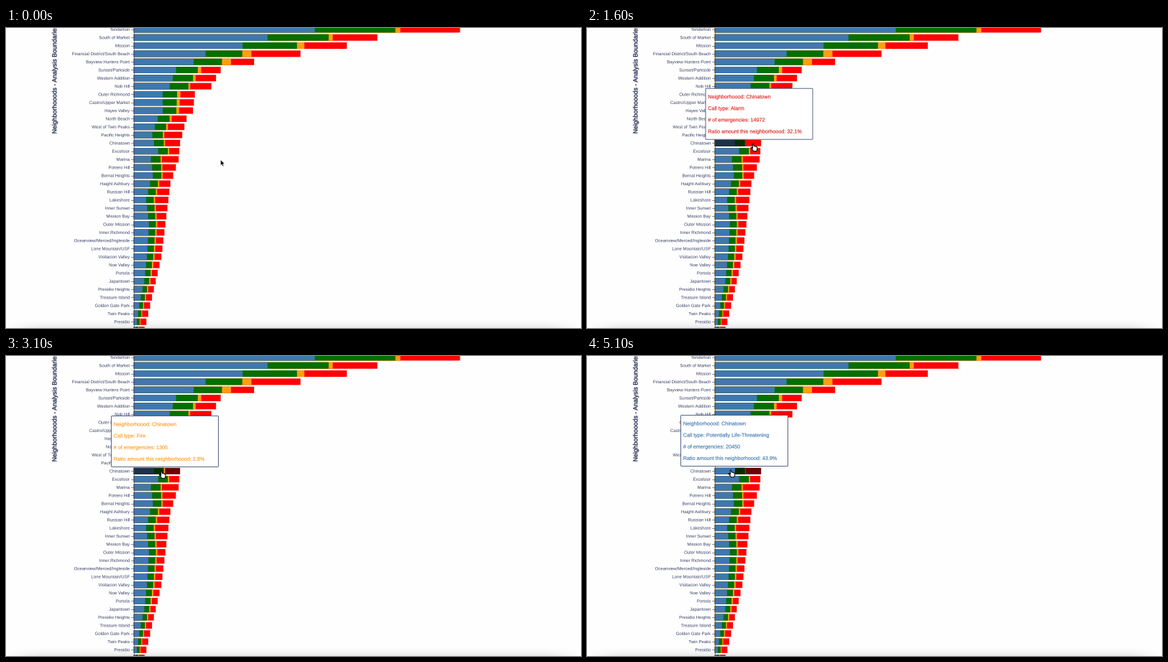
Recreate the animation shown at these times as a matplotlib script. Size 800 px wide and 418 px high, loop 5.2 s.

```python
import numpy as np
import matplotlib.pyplot as plt
from matplotlib.animation import FuncAnimation
from matplotlib.colors import to_rgb
from matplotlib.patches import FancyBboxPatch, PathPatch, Polygon, Rectangle
from matplotlib.textpath import TextPath
from matplotlib.transforms import Affine2D

W, H, DPI = 800, 418, 100
FRAMES, STEP = 52, 100
PX = 72 / DPI  # one pixel in points

NAVY, SLATE = "#22294f", "#3a4064"
COLORS = ["#4077ae", "#007000", "#ff9f0a", "#ff0000"]
X0, Y0, PITCH, BAR = 177.7, 1.9, 11.317, 9
ROWS = 38
DIM = 0.42
FOCUS = 14  # row under the pointer

NAMES = """Tenderloin,South of Market,Mission,Financial District/South Beach
Bayview Hunters Point,Sunset/Parkside,Western Addition,Nob Hill,Outer Richmond
Castro/Upper Market,Hayes Valley,North Beach,West of Twin Peaks,Pacific Heights
Chinatown,Excelsior,Marina,Potrero Hill,Bernal Heights,Haight Ashbury
Russian Hill,Lakeshore,Inner Sunset,Mission Bay,Outer Mission,Inner Richmond
Oceanview/Merced/Ingleside,Lone Mountain/USF,Visitacion Valley,Noe Valley
Portola,Japantown,Presidio Heights,Treasure Island,Golden Gate Park
Twin Peaks,Presidio""".replace("\n", ",").split(",")

# Key rows; rows between them are interpolated
TOTAL = {0: 454, 1: 339, 2: 296.5, 3: 232, 4: 167.5, 5: 121, 7: 108, 8: 85,
         10: 82.5, 11: 73.5, 14: 64.5, 16: 62.5, 19: 51, 28: 38.5, 37: 15}
BLUE = {0: .555, 1: .549, 2: .511, 3: .431, 4: .498, 7: .463, 10: .49,
        13: .383, 14: .437, 15: .535, 16: .384, 18: .486, 21: .36, 24: .48,
        31: .48, 37: .2}
GREEN = {0: .247, 2: .255, 3: .22, 5: .25, 14: .212, 37: .23}
ORANGE = {0: .015, 1: .017, 2: .035, 4: .075, 5: .04, 7: .023, 8: .055,
          14: .027, 37: .07}

# Per segment: call type, count, ratio, tooltip corner, text colour
TIPS = [
    ("Potentially Life-Threatening", 20450, 43.9, (130.5, 82.5), "#3a77b0"),
    ("Non Life-threatening", 9851, 21.1, (145, 83.5), "#148014"),
    ("Fire", 1305, 2.8, (146.5, 83.5), "#ff9a1a"),
    ("Alarm", 14972, 32.1, (165, 84.2), "#e01a1a"),
]
HOVERS = [(1000, 3), (2500, 2), (3200, 1), (4000, 0)]  # start ms, segment

# Pointer hotspot at key times (ms)
SPOTS = {400: (298.5, 183.5), 1000: (234.6, 161.8), 1400: (234.6, 161.8),
         2100: (222.5, 160.8), 2800: (220, 160.4), 3200: (215, 160.4),
         3600: (212, 160.2), 4000: (200, 158.8)}
ARROW = np.array([(0, 0), (0, 8.2), (1.9, 6.5), (3.2, 9.6), (4.6, 9),
                  (3.3, 6), (5.8, 5.8)])
HAND = np.array([(-1, .6), (-.3, 0), (.6, .5), (1, 3.2), (2, 2.9), (2.8, 3.6),
                 (3.8, 3.3), (4.4, 4.2), (5.3, 4.2), (5.8, 5.2), (5.6, 7.5),
                 (4.8, 10), (.5, 10), (-.8, 8), (-3, 5.4), (-2.6, 4.7),
                 (-1.6, 5), (-.6, 6.2)])

fig = plt.figure(figsize=(W / DPI, H / DPI), dpi=DPI, facecolor="#fefefe")
ax = fig.add_axes([0, 0, 1, 1])
ax.set_axis_off()


def along(keys, at):
    return np.interp(at, list(keys), list(keys.values()))


def text(x, y, s, size, color, right=False, upright=False, stroke=0, z=3):
    """Draw s with its baseline at (x, y); upright text reads bottom to top."""
    path = TextPath((0, 0), s, size=size, prop={"family": "Liberation Sans"})
    if right:
        x -= path.get_extents().x1
    turn = [[0, -1, x], [-1, 0, y]] if upright else [[1, 0, x], [0, -1, y]]
    path = Affine2D(np.array(turn + [[0, 0, 1]])).transform_path(path)
    return ax.add_patch(PathPatch(path, fc=color, ec=color, lw=stroke * PX,
                                  zorder=z))


def make_tip(kind, count, ratio, corner, color):
    x, y = corner
    box = FancyBboxPatch((x, y), 149, 71, boxstyle="round,pad=0,rounding_size=1.2",
                         fc="white", ec="#46557c", lw=0.9 * PX, zorder=5)
    parts = [ax.add_patch(box)]
    lines = ["Neighborhoood: Chinatown", f"Call type: {kind}",
             f"# of emergencies: {count}",
             f"Ratio amount this neighborhoood: {ratio}%"]
    for i, line in enumerate(lines):
        parts.append(text(x + 3.3, y + 14 + 16.1 * i, line, 7.2, color,
                          stroke=0.12, z=6))
    return parts


def hovered(t):
    past = [seg for start, seg in HOVERS if start <= t]
    return past[-1] if past else None


def brightness():
    """Segments fade towards dim or full light after each hover change."""
    levels = np.ones((FRAMES, 4))
    for f in range(1, FRAMES):
        seg = hovered((f - 1) * STEP)
        goal = np.array([1 if seg in (None, i) else DIM for i in range(4)])
        levels[f] = levels[f - 1] + np.clip(goal - levels[f - 1], -.15, .15)
    return levels


# Soft shadow along the bottom edge
fade_x = np.clip(np.minimum(np.arange(W), W - np.arange(W)) / 45, 0, 1)
fade_y = np.linspace(0, 1, 14) ** 1.6
shade = np.zeros((14, W, 4))
shade[..., 3] = 0.085 * fade_y[:, None] * fade_x
ax.imshow(shade, extent=(0, W, H, H - 14), aspect="auto", zorder=0)

# Widest segment first, so narrower ones cover it without seams
rows = np.arange(ROWS)
shares = [along(keys, rows) for keys in (BLUE, GREEN, ORANGE)]
widths = along(TOTAL, rows) * np.vstack([np.cumsum(shares, axis=0),
                                         np.ones(ROWS)])
focus_bars = {}
for row in rows:
    mid = Y0 + PITCH * row
    for seg in (3, 2, 1, 0):
        bar = ax.add_patch(Rectangle((X0, mid - BAR / 2), widths[seg, row],
                                     BAR, fc=COLORS[seg], lw=0, snap=False,
                                     zorder=2))
        if row == FOCUS:
            focus_bars[seg] = bar
    ax.plot([174, 177.5], [mid, mid], color=SLATE, lw=0.6 * PX, zorder=3)
for row, name in enumerate(NAMES):
    text(172, Y0 + PITCH * row + 2.1, name, 6.05, SLATE, right=True)
ax.plot([177.5] * 2, [-5, H + 5], color=SLATE, lw=0.6 * PX, zorder=3)
text(70.3, 147.3, "Neighborhooods - Analysis Boundaries", 8.75, NAVY,
     upright=True, stroke=0.3)

tips = [make_tip(*tip) for tip in TIPS]
pointer = ax.add_patch(Polygon(ARROW, closed=True, joinstyle="round", zorder=9))
ax.set_xlim(0, W)
ax.set_ylim(H, 0)
LIGHT = brightness()


def update(frame):
    t = frame * STEP
    seg = hovered(t)
    for i, parts in enumerate(tips):
        for part in parts:
            part.set_visible(i == seg)
    for i, bar in focus_bars.items():
        bar.set_facecolor(LIGHT[frame, i] * np.array(to_rgb(COLORS[i])))
    spot = [np.interp(t, list(SPOTS), axis) for axis in zip(*SPOTS.values())]
    arrow = seg is None
    pointer.set_xy((ARROW if arrow else HAND) + spot)
    pointer.set_facecolor("black" if arrow else "white")
    pointer.set_edgecolor("white" if arrow else "black")
    pointer.set_linewidth((0.6 if arrow else 1) * PX)
    return [pointer]


anim = FuncAnimation(fig, update, frames=FRAMES, interval=STEP, repeat=True,
                     repeat_delay=0)
plt.show()
```
